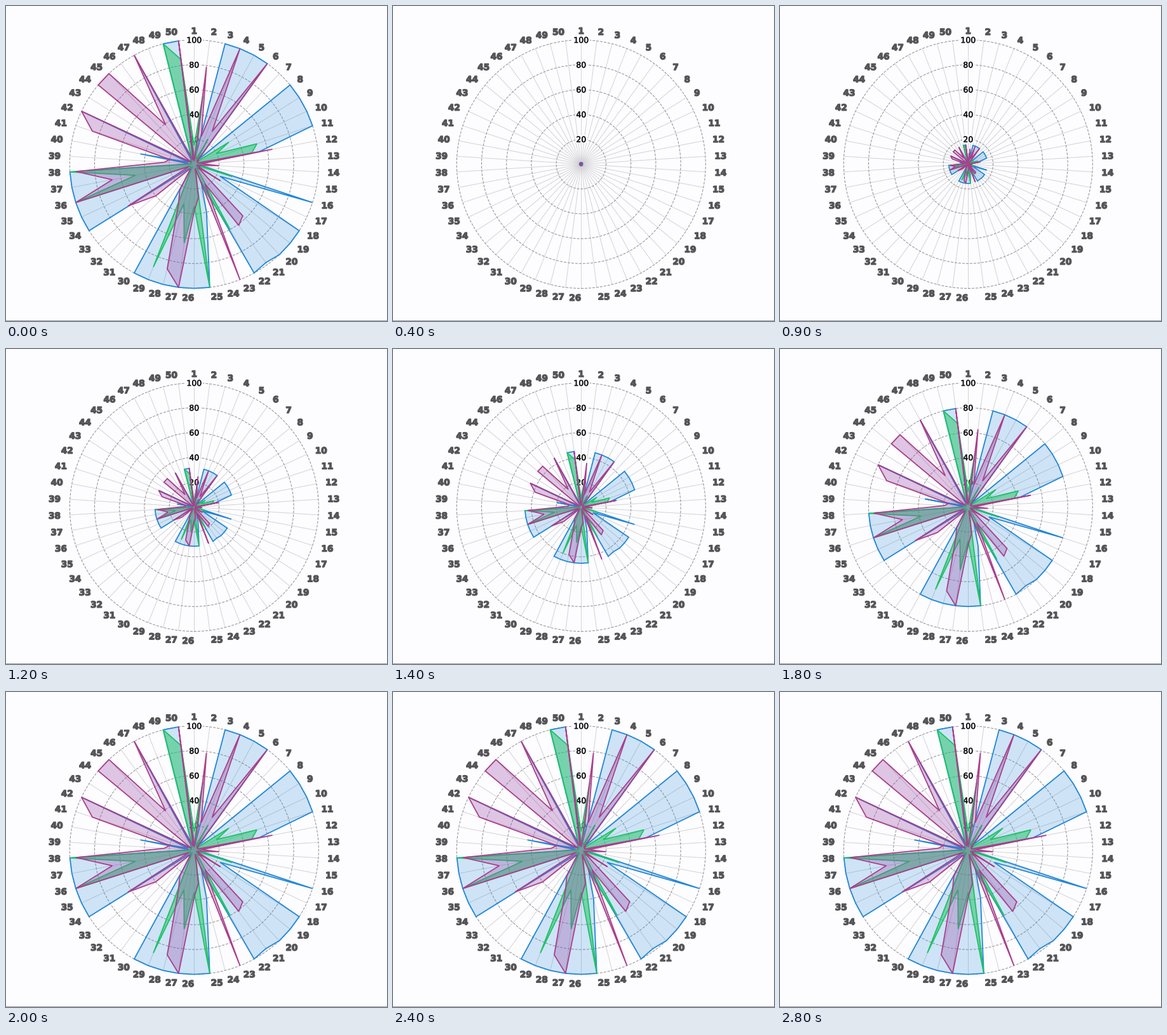
These frames come from a looping animation (600x497 px, 2900 ms). A matplotlib script:

```python
import numpy as np
import matplotlib.pyplot as plt
from matplotlib.animation import FuncAnimation
from matplotlib.patches import Circle, Polygon
from matplotlib.patheffects import withStroke

W, H, DPI = 600, 497, 64
PX = 72 / DPI  # points per pixel
CX, CY, R = 296.3, 249.5, 196
SPOKES = 50
STEP, FRAMES = 100, 29
START, GROW = 190, 1800
BG = "#fdfcfe"

rng = np.random.default_rng(4)
angles = np.arange(SPOKES) * 2 * np.pi / SPOKES
dirs = np.column_stack([np.sin(angles), -np.cos(angles)])
center = np.array([CX, CY])

fig = plt.figure(figsize=(W / DPI, H / DPI), dpi=DPI, facecolor=BG)
ax = fig.add_axes([0, 0, 1, 1])
ax.set_xlim(0, W)
ax.set_ylim(H, 0)
ax.axis("off")


def series(full, **peaks):
    """Low noise, full-length spans of spokes, and single peaks such as s12=53."""
    values = rng.uniform(2, 6, SPOKES)
    for first, last in full:
        values[first - 1:last] = 100
    for spoke, value in peaks.items():
        values[int(spoke[1:]) - 1] = value
    return values / 100


def label(x, y, text, size, color, stroke, ha="center", **kw):
    """Digits centred vertically on y, thickened by a thin outline."""
    ax.text(x, y + 0.365 * size, text, fontsize=size * PX, color=color, ha=ha,
            va="baseline", family="DejaVu Sans", zorder=3,
            path_effects=[withStroke(linewidth=stroke * PX, foreground=color)], **kw)


def draw_grid():
    for d in dirs:
        end = center + R * d
        ax.plot([CX, end[0]], [CY, end[1]], color="#d3d3d5", lw=PX, zorder=1)
    for value in range(20, 101, 20):
        r = R * value / 100
        ax.add_patch(Circle(center, r, fill=False, ec="#8f8f92", lw=PX,
                            ls=(0, (4, 2)), zorder=2))
        half = 4.2 * len(str(value)) + 1
        ax.fill_between([CX - half, CX + half], CY - r - 6, CY - r + 6,
                        color=BG, lw=0, zorder=2.5)
        label(CX, CY - r, str(value), 12.5, "#111111", 0.5)
    for i, d in enumerate(dirs):
        x, y = center + 210.5 * d
        ha = "center" if i == 0 else "left" if i < SPOKES / 2 else "right"
        label(x, y, str(i + 1), 13.6, "#555558", 1.4, ha, weight="bold")
    ax.plot([0, W], [495.5, 495.5], color="#9a9a9c", lw=PX)


def add_area(values, edge, face, alpha, z):
    fill = Polygon(dirs, fc=face, ec="none", alpha=alpha, zorder=z)
    line = Polygon(dirs, fill=False, ec=edge, lw=1.8 * PX, joinstyle="miter", zorder=z + 0.1)
    ax.add_patch(fill)
    ax.add_patch(line)
    return values, (fill, line)


def growth(t):
    if t < START:
        return 1.0
    return min(1.0, (t - START) / GROW) ** 2


blue = series([(3, 6), (8, 11), (16, 16), (18, 22), (25, 30), (34, 38),
               (42, 42), (47, 47), (49, 50)],
              s12=53, s17=23, s21=98, s23=15, s24=40, s40=44)
green = series([(25, 25), (36, 36), (38, 38), (49, 49)],
               s1=15, s2=55, s5=23, s9=33, s10=20, s11=53, s12=47, s16=32,
               s22=60, s23=22, s26=34, s27=64, s28=33, s29=89, s37=48, s50=85)
pink = series([(4, 4), (6, 6), (23, 23), (27, 27), (36, 36), (38, 38), (42, 42),
               (44, 45), (47, 47), (50, 50)],
              s2=79, s3=23, s5=30, s12=64, s14=20, s18=25, s20=57, s21=61, s22=18,
              s25=27, s26=38, s28=87, s29=34, s30=24, s33=40, s34=63, s37=67,
              s38=95, s39=24, s40=20, s41=86, s46=39)

draw_grid()
areas = [add_area(blue, "#2288d9", "#2288d9", 0.21, 4),
         add_area(green, "#1fc266", "#1fc266", 0.5, 5),
         add_area(pink, "#aa3f8c", "#9848a5", 0.3, 6)]


def update(i):
    scale = R * growth(i * STEP)
    for values, shapes in areas:
        points = center + scale * values[:, None] * dirs
        for shape in shapes:
            shape.set_xy(points)
    return [shape for _, shapes in areas for shape in shapes]


anim = FuncAnimation(fig, update, frames=FRAMES, interval=STEP, repeat=True,
                     repeat_delay=0, blit=False)
plt.show()
```
